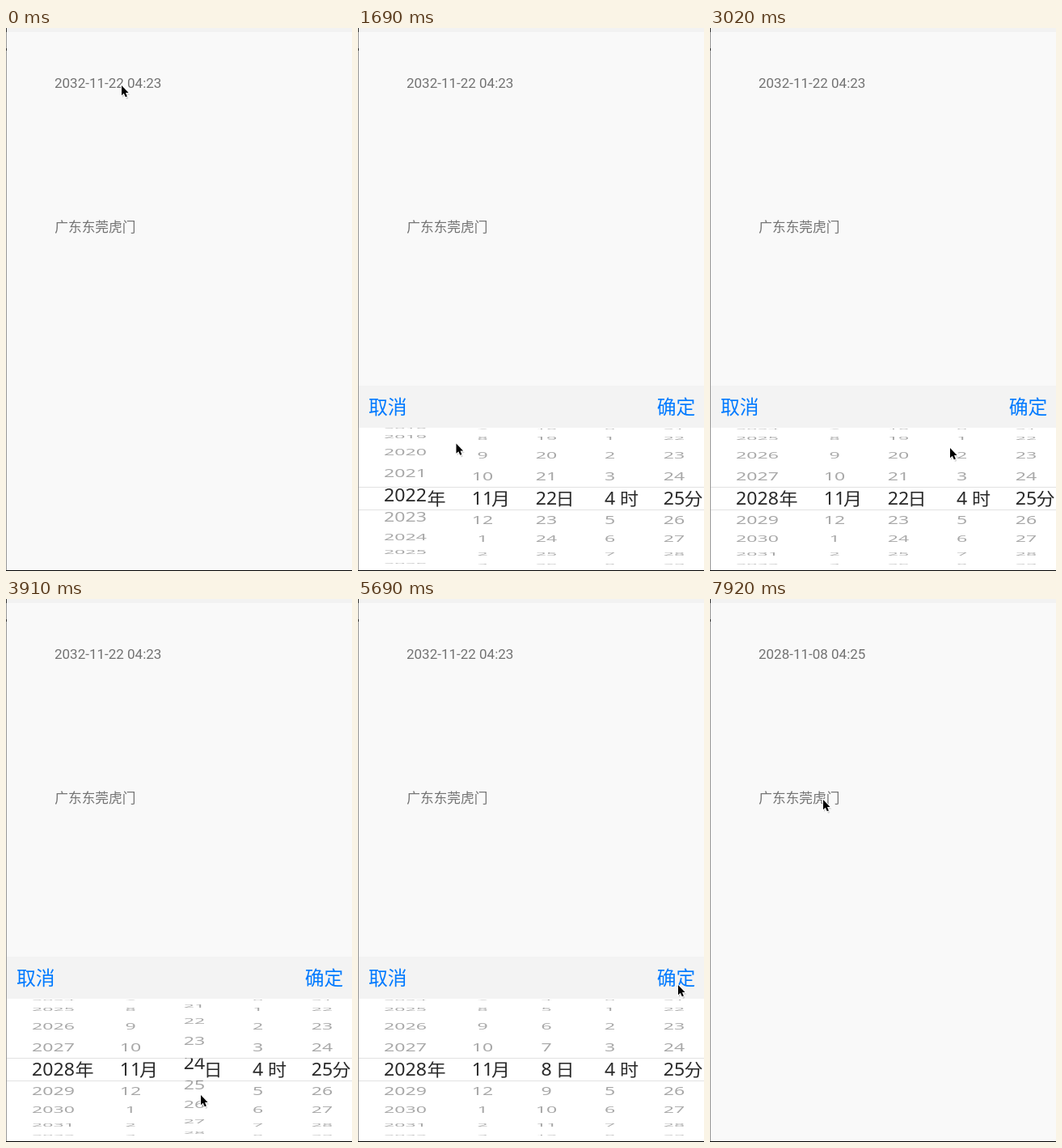
Animation, 428 px wide and 671 px high, one loop 8000 ms. Source, as an HTML page:

```html
<!DOCTYPE html>
<html lang="zh-CN">
<head>
<meta charset="utf-8">
<title>Date picker</title>
<style>
  html, body { margin: 0; width: 100%; height: 100%; overflow: hidden; background: #f9f9f9; }
  svg { display: block; width: 428px; height: 671px; }
  .page { font: 16.7px Roboto, "Noto Sans CJK SC", "Noto Sans CJK", sans-serif; fill: #737373; }
  .btn { font: 500 23.8px "Noto Sans CJK SC", "Noto Sans CJK", sans-serif; fill: #007aff; }
  .wheel { font: 21px "Noto Sans", "Noto Sans CJK SC", "Noto Sans CJK", sans-serif; }
  .outer { fill: #a8a8a8; text-anchor: middle; }
  .inner { fill: #2a2a2a; text-anchor: middle; }
  .label { fill: #2a2a2a; }
</style>
</head>
<body>
<svg viewBox="0 0 428 671">
  <defs>
    <clipPath id="outside">
      <rect x="0" y="494" width="428" height="73.5"/>
      <rect x="0" y="595.5" width="428" height="75"/>
    </clipPath>
    <clipPath id="band"><rect x="0" y="567.5" width="428" height="28"/></clipPath>
  </defs>
  <rect width="428" height="671" fill="#f9f9f9"/>
  <rect width="428" height="5" fill="#f2f2f2"/>
  <g class="page">
    <text id="date" x="60" y="74" font-size="17"></text>
    <text x="60.3" y="252">广东东莞虎门</text>
  </g>
  <g id="dialog">
    <rect y="442" width="428" height="52" fill="#f3f3f3"/>
    <rect y="494" width="428" height="177" fill="#fff"/>
    <text class="btn" x="13" y="477">取消</text>
    <text class="btn" id="ok" x="369.8" y="477">确定</text>
    <path d="M0 567.5H428M0 595.5H428" stroke="#e2e2e2"/>
    <g class="wheel">
      <g id="outer" class="outer" clip-path="url(#outside)"></g>
      <g id="inner" class="inner" clip-path="url(#band)"></g>
      <g id="labels" class="label"></g>
    </g>
  </g>
  <rect width="1" height="671" fill="#999"/>
  <path d="M.5 0V5M.5 25V28" stroke="#333"/>
  <rect y="670" width="428" height="1" fill="#000"/>
  <g id="cursor">
    <path d="M1 2V15L4 12L6 17L8.5 16L6.4 11.5H10.5Z" fill="#000" opacity=".15"/>
    <path d="M0 0V12.2L2.8 9.7L4.8 14.3L6.9 13.4L5 9H8.6Z" fill="#000" stroke="#fff" stroke-width="1.8" paint-order="stroke"/>
  </g>
</svg>
<script>
const LOOP = 8000, FIRST = 490, STEP = 148.3;
const CENTER = 581, RADIUS = 88, ROW_ANGLE = Math.PI / 10;
const TEXT_H = 19.7, STRETCH = 1.1, REACH = 5;

const $ = id => document.getElementById(id);
const clamp = v => Math.min(1, Math.max(0, v));
const easeOut = (k, from, to, power) => 1 - (1 - clamp((k - from) / (to - from))) ** power;
const wrap = (n, size, first) => ((n - first) % size + size) % size + first;

const columns = [
  { x: 58.5, labelX: 85.5, label: '年', show: n => n,
    value: k => 2015 + 10 * easeOut(k, 5, 11, 1.8) + 3 * easeOut(k, 14, 17, 1.6) },
  { x: 154, labelX: 165, label: '月', show: n => wrap(n, 12, 1), value: () => 11 },
  { x: 233, labelX: 244.5, label: '日', show: n => wrap(n, 30, 1),
    value: k => 22 + 16 * easeOut(k, 22, 34, 1.766) },
  { x: 311.5, labelX: 324, label: '时', show: n => wrap(n, 24, 0), value: () => 4 },
  { x: 391, labelX: 403.5, label: '分', show: n => wrap(n, 60, 0), value: () => 25 }
];

// Pointer stops: step, x, y
const path = [
  [2, 142, 70], [3, 142, 200], [4, 147, 368], [5, 114, 600], [7, 119, 530],
  [9, 122, 495], [11, 124, 480], [12, 124, 480], [14, 112, 595], [15, 118, 560],
  [16, 195, 525], [17, 296, 518], [20, 349, 511], [22, 262, 606], [23, 240, 612],
  [25, 275, 545], [27, 326, 513], [28, 331, 511], [31, 336, 509], [34, 395, 476],
  [44, 395, 476], [45, 370, 459], [46, 251, 381], [47, 170, 313], [48, 157, 284],
  [49, 145, 260], [50, 139, 247]
];

function addText(parent) {
  const node = document.createElementNS('http://www.w3.org/2000/svg', 'text');
  $(parent).append(node);
  return node;
}

function place(node, x, y, scaleY, text) {
  node.setAttribute('transform', `translate(${x} ${y}) scale(${STRETCH} ${scaleY})`);
  if (node.textContent !== text) node.textContent = text;
}

for (const col of columns) {
  col.rows = Array.from({ length: 2 * REACH + 1 }, () => [addText('outer'), addText('inner')]);
  place(addText('labels'), col.labelX, 589, 1, col.label);
}

function drawWheel(col, k) {
  const value = col.value(k), base = Math.round(value);
  col.rows.forEach(([outer, inner], i) => {
    const n = base + i - REACH;
    const angle = (n - value) * ROW_ANGLE;
    const squash = Math.cos(angle);
    const top = CENTER + RADIUS * Math.sin(angle) - squash * TEXT_H / 2;
    const visible = Math.abs(angle) < Math.PI / 2 - 0.01;
    const text = visible ? String(col.show(n)) : '';
    const scale = 0.8 * squash * squash;
    place(outer, col.x, top + scale * TEXT_H, scale, text);
    place(inner, col.x, top + squash * (TEXT_H - 1.8), squash, Math.abs(n - value) < 1.5 ? text : '');
  });
}

function pointerAt(k) {
  const next = path.findIndex(p => p[0] >= k);
  if (next < 0) return path[path.length - 1].slice(1);
  if (next === 0) return path[0].slice(1);
  const a = path[next - 1], b = path[next];
  const u = (k - a[0]) / (b[0] - a[0]);
  return [a[1] + (b[1] - a[1]) * u, a[2] + (b[2] - a[2]) * u];
}

function draw(t) {
  const k = Math.floor((t - FIRST) / STEP);
  const open = k >= 0 && k < 42;
  const slide = k < 2 ? 229 * (1 - (k + 0.7) / 2.7) ** 2 : k === 41 ? 82 : 0;
  $('dialog').style.display = open ? '' : 'none';
  $('dialog').setAttribute('transform', `translate(0 ${slide})`);
  $('ok').style.fill = k === 39 || k === 40 ? '#c2daf5' : '';
  $('date').textContent = k < 41 ? '2032-11-22 04:23' : '2028-11-08 04:25';
  if (open) columns.forEach(col => drawWheel(col, k));
  const [x, y] = pointerAt(k);
  $('cursor').setAttribute('transform', `translate(${x + 1} ${y + 1})`);
}

let start;
function tick(now) {
  start ??= now;
  draw((now - start) % LOOP);
  requestAnimationFrame(tick);
}
draw(0);
requestAnimationFrame(tick);
</script>
</body>
</html>
```
